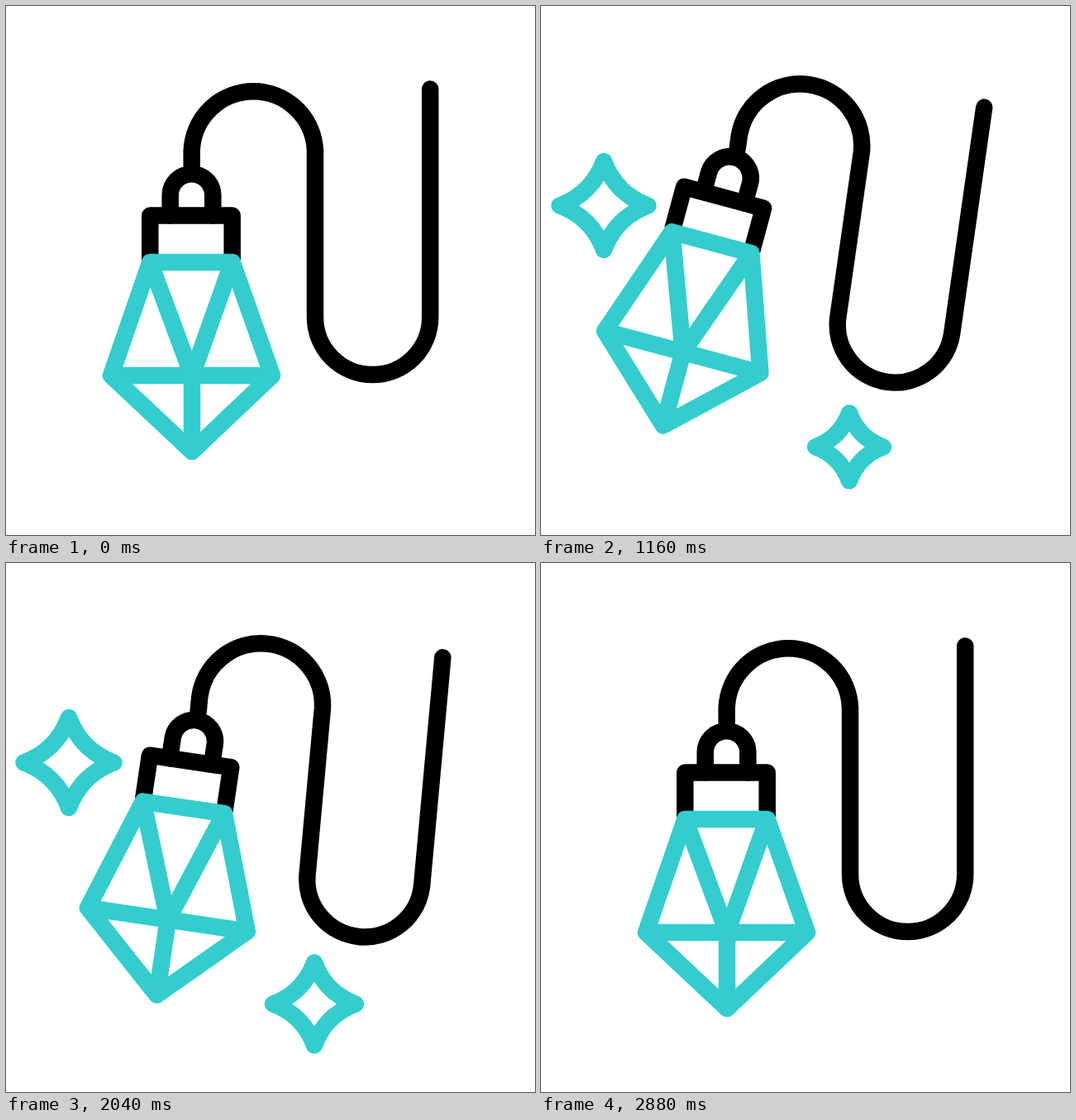
An HTML page that plays this animation: 640x640 px, repeating every 3000 ms.

```html
<!DOCTYPE html>
<html lang="en">
<head>
<meta charset="utf-8">
<title>Swinging crystal pendant</title>
<style>
  html, body { margin: 0; width: 100%; height: 100%; overflow: hidden; background: #fff; }
  svg { display: block; width: 100vw; height: 100vh; }
  path { fill: none; stroke: #000; stroke-width: 20.5; stroke-linecap: round; stroke-linejoin: round; }
  .teal { stroke: #33cdcd; }
</style>
</head>
<body>
<svg viewBox="0 0 640 640">
  <g id="cord">
    <path d="M224.7 193V175.2A74.7 74.7 0 0 1 374 175.2V376.5A69.6 69.6 0 0 0 513.2 376.5V100.5"/>
    <g id="pendant">
      <path d="M198.7 253.5V229A25.8 25.8 0 0 1 250.3 229V253.5"/>
      <path d="M174.3 307V253.5H273.7V307" style="stroke-linecap: butt"/>
      <path class="teal" d="M174.3 310H273.7L322 447L225 539L127 447ZM174.3 310L225 447L273.7 310M127 447H322M225 447V539"/>
    </g>
  </g>
  <path id="left" class="teal" transform="translate(76 241.5)"/>
  <path id="low" class="teal" transform="translate(373 533.5)"/>
</svg>
<script>
const LOOP = 3000, STEP = 40;
const $ = id => document.getElementById(id);
const cord = $('cord'), pendant = $('pendant');

// [time in ms, angle in degrees]; the pendant lags behind the cord
const cordKeys = [[200, 0], [600, -8.4], [1215, 8.5], [1655, -6.5], [2190, 8], [2475, -3.9], [2860, 0]];
const pendantKeys = [[275, 0], [680, -8.4], [1270, 8.5], [1745, -6.2], [2230, 8], [2550, -3.9], [2880, 0]];

const stars = [
  { el: $('left'), start: 897, period: 460 },
  { el: $('low'), start: 785, period: 473 }
];
const PULSES = 4, GAP = 45;

function angleAt(keys, t) {
  const i = keys.findIndex(k => k[0] > t);
  if (i < 1) return 0;
  const [t0, a] = keys[i - 1], [t1, b] = keys[i];
  const p = (t - t0) / (t1 - t0);
  return a + (b - a) * p * p * (3 - 2 * p);
}

function starPath(r) {
  const k = r * 0.27;
  return `M0 ${-r}Q${k} ${-k} ${r} 0Q${k} ${k} 0 ${r}Q${-k} ${k} ${-r} 0Q${-k} ${-k} 0 ${-r}Z`;
}

// Each pulse pops in, swells, shrinks and pops out
function drawStar({ el, start, period }, t) {
  const u = t - start, phase = u % period;
  const on = u > 0 && u < period * PULSES && phase >= GAP && phase <= period - GAP;
  const r = 43.75 - 10.75 * Math.cos(2 * Math.PI * phase / period);
  el.setAttribute('d', on ? starPath(r) : '');
}

function draw(now) {
  const t = Math.floor(now % LOOP / STEP) * STEP;
  cord.setAttribute('transform', `rotate(${angleAt(cordKeys, t)} 369 273.5)`);
  pendant.setAttribute('transform', `rotate(${angleAt(pendantKeys, t)} 224.7 193)`);
  stars.forEach(s => drawStar(s, t));
}

function tick() {
  draw(performance.now());
  requestAnimationFrame(tick);
}
tick();
</script>
</body>
</html>
```
